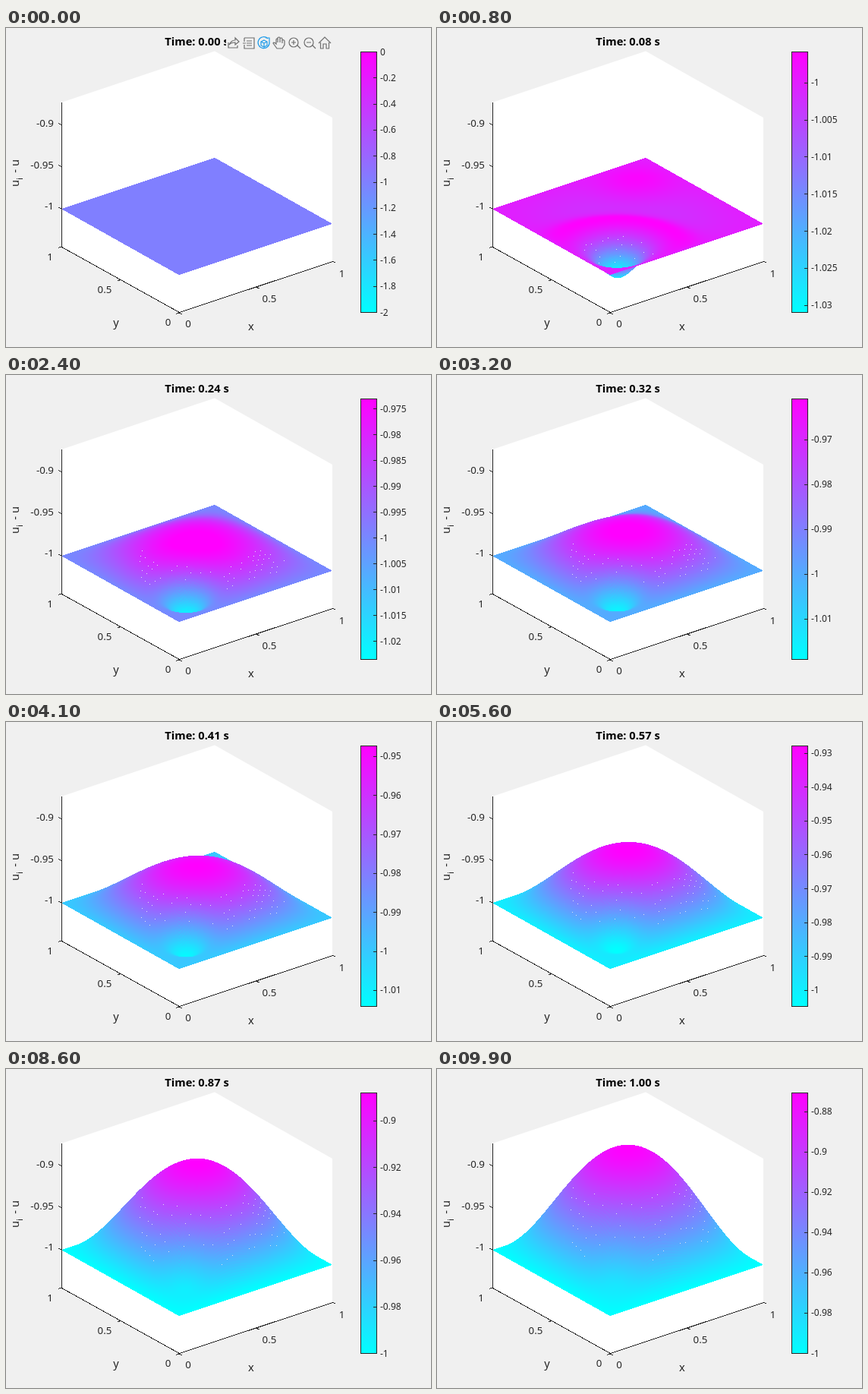
Recreate the animation shown at these times as an HTML page with a canvas. Size 560 px wide and 420 px high, loop 10000 ms.

```html
<!DOCTYPE html>
<html lang="en">
<head>
<meta charset="utf-8">
<title>Surface over time</title>
<style>
html, body { margin: 0; width: 100%; height: 100%; overflow: hidden; background: #f0f0f0; }
svg, canvas { position: absolute; left: 0; top: 0; }
text { font: 13.33px "Noto Sans", "Open Sans", sans-serif; fill: #262626; }
.mid { text-anchor: middle; }
.end { text-anchor: end; }
.label { font-size: 14.67px; text-anchor: middle; }
#title { font-size: 14.67px; font-weight: bold; fill: #000; }
#scale text { font-size: 12px; }
.line { stroke: #262626; fill: none; shape-rendering: crispEdges; }
.icon { stroke: #6e6e6e; stroke-width: 1.2; fill: none; }
</style>
</head>
<body>
<svg width="560" height="420">
  <path d="M73 98L275 30.500L430 118V307L228 375L73 288Z" fill="#fff"/>
</svg>
<canvas width="560" height="420"></canvas>
<svg width="560" height="420">
  <defs>
    <linearGradient id="cool" x2="0" y2="1">
      <stop stop-color="#f0f"/><stop offset="1" stop-color="#0ff"/>
    </linearGradient>
  </defs>
  <path class="line" d="M73.500 98V288.500L228.500 374.500L430.500 307.500"/>
  <path class="line" d="M73 127.500l-4 -2M73 182.500l-4 -2M73 238l-4 -2M73 288l-4 1.400M151 331.500l-4 1.400M228 375l-4 1.400M228 375l4 2M329.500 341l4 2M430 307l4 2"/>
  <text class="end" x="63" y="130">-0.9</text>
  <text class="end" x="63" y="185">-0.95</text>
  <text class="end" x="63" y="239">-1</text>
  <text class="mid" x="58" y="306">1</text>
  <text class="mid" x="130" y="349">0.5</text>
  <text class="mid" x="213.500" y="392">0</text>
  <text class="mid" x="240" y="394">0</text>
  <text class="mid" x="347" y="361">0.5</text>
  <text class="mid" x="442.500" y="328">1</text>
  <text class="label" x="145" y="393">y</text>
  <text class="label" x="323" y="398">x</text>
  <text class="label" transform="translate(16.500 191) rotate(-90)">u<tspan dy="5" font-size="11.500">i</tspan><tspan dx="2.500" dy="-5"> - u</tspan></text>
  <text id="title" class="mid" x="251.500" y="23"></text>
  <rect class="line" x="467.500" y="31.500" width="21" height="343" style="fill:url(#cool)"/>
  <g id="scale"></g>
  <g id="tools">
    <path d="M290 9H430V31H290Z" fill="#f0f0f0"/>
    <g class="icon">
      <path d="M293 19V26H305V23M294 22Q297 16 302 16V13L307 18L302 22V19Q297 19 294 22"/>
      <path d="M314 13H327V27H314V22M314 18V13M317 17H324M317 20H324M317 23H324M312 20H316"/>
      <path stroke="#1e9be9" d="M345 14A7.500 7.500 0 1 0 347 18M342 13H347V18M340 16L344 18V23L340 25L336 23V18ZM336 18L340 20L344 18M340 20V25"/>
      <path d="M357 27L352 20Q353 18 356 21V15Q357 13 358 15V19V13Q360 11 361 13V19V14Q363 12 364 14V20V16Q366 15 367 17V22L364 27Z"/>
      <path d="M384 23L388 27M376 19H382M379 16V22M404 23L408 27M396 19H402"/>
      <circle cx="379" cy="19" r="6"/><circle cx="399" cy="19" r="6"/>
      <path d="M412 20L420 12L428 20M414.500 19V27H418V21H422V27H425.500V19"/>
    </g>
  </g>
</svg>
<script>
const $ = id => document.getElementById(id);
const ctx = document.querySelector('canvas').getContext('2d');
const image = ctx.createImageData(560, 420);
const pixels = new Uint32Array(image.data.buffer);
const { sin, exp, min, max, round, floor, ceil, hypot, PI } = Math;

// [time, lowest, highest] offsets from -1 for the colour scale
const limits = [[0, 0, 0], [.03, -.02, .0015], [.081, -.031, .0042], [.242, -.0235, .0269],
  [.414, -.0141, .0527], [.566, -.0047, .0722], [.645, 0, .0825], [.747, 0, .0959], [1, 0, .1294]];

function range(t) {
  if (t === 0) return [-1, 1];
  const n = limits.findIndex(p => p[0] >= t), a = limits[n - 1], b = limits[n];
  const f = (t - a[0]) / (b[0] - a[0]);
  return [1, 2].map(k => a[k] + (b[k] - a[k]) * f);
}

const bell = (d, width) => exp(-d * d / (2 * width * width));

// Growing hump, fuller at the back, a dent near the corner and a fading ripple
function surface(t) {
  if (t === 0) return () => 0;
  const fade = exp(-10 * t) * (1 - exp(-50 * t));
  const hump = .1305 * t - .0011 - .029 * fade;
  const dent = .052 * (1 - exp(-30 * t)) * exp(-.2 * t);
  return (x, y) => {
    const s = max(0, sin(PI * x) * sin(PI * y)), r = hypot(x - .2, y - .2);
    const ripple = bell(r - .35, .075) + bell(hypot(x - .8, y - .82), .16);
    const full = s * (1 + .17 * (x + y) * (1 - s));
    return hump * full + s ** .4 * (.017 * fade * ripple - dent * bell(r, .09));
  };
}

const screenY = (x, y, h) => 325.2 - 67.4 * x - 87 * y - 1105 * h;

function drawSurface(t, lo, hi) {
  const height = surface(t), steps = 120;
  pixels.fill(0);
  // Each column is swept from back to front
  for (let px = 73; px < 430; px++) {
    const u = px + .5 - 228;
    const near = max(0, -u / 155), far = min(1, (202 - u) / 155);
    let last;
    for (let k = 0; k <= steps; k++) {
      const y = far + (near - far) * k / steps, x = (u + 155 * y) / 202;
      const h = height(x, y), sy = screenY(x, y, h);
      if (k) {
        const c = round(255 * min(1, max(0, (h - lo) / (hi - lo))));
        const colour = (0xffff0000 | (255 - c) << 8 | c) >>> 0;
        const end = max(last, sy);
        for (let py = ceil(min(last, sy) - .5); py < end - .5; py++) pixels[py * 560 + px] = colour;
      }
      last = sy;
    }
  }
  if (t > .02) drawSpecks(t, height, hi);
  ctx.putImageData(image, 0, 0);
}

function drawSpecks(t, height, hi) {
  for (let i = 1; i < 28; i++) for (let j = 1; j < 28; j++) {
    const noise = sin(i * 12.9 + j * 78.2) * 43758;
    if (noise - floor(noise) > .5) continue;
    const x = i / 28, y = j / 28, h = height(x, y), q = h / hi;
    const shown = t < .15 ? h < -.003 && h > -.022 && x + y > .42
      : q > .28 && q < .74 && x + y < 1.05 && y - x < .4;
    if (shown) pixels[round(screenY(x, y, h)) * 560 + round(228 + 202 * x - 155 * y)] = 0xffeee4dc;
  }
}

function drawScale(lo, hi) {
  const span = hi - lo;
  let step = 10 ** floor(Math.log10(span / 10.5));
  step *= [1, 2, 5, 10].find(m => span / (step * m) <= 10.5);
  let out = '';
  for (let n = ceil((lo - 1) / step - .01); n * step <= hi - 1 + step * .01; n++) {
    const v = n * step, y = 374.5 - 343 * (v + 1 - lo) / span;
    out += `<path class="line" d="M484 ${round(y - .5) + .5}h4"/><text x="493" y="${round(y + 4)}">${+v.toFixed(4) || 0}</text>`;
  }
  $('scale').innerHTML = out;
}

let shown = -1;
const start = performance.now();
function tick() {
  const n = floor(max(0, performance.now() - start) / 100) % 100;
  if (n !== shown) {
    shown = n;
    const t = n / 99, [lo, hi] = range(t);
    $('title').textContent = `Time: ${t.toFixed(2)} s`;
    $('tools').style.display = n ? 'none' : '';
    drawSurface(t, lo, hi);
    drawScale(lo, hi);
  }
  requestAnimationFrame(tick);
}
tick();
</script>
</body>
</html>
```
